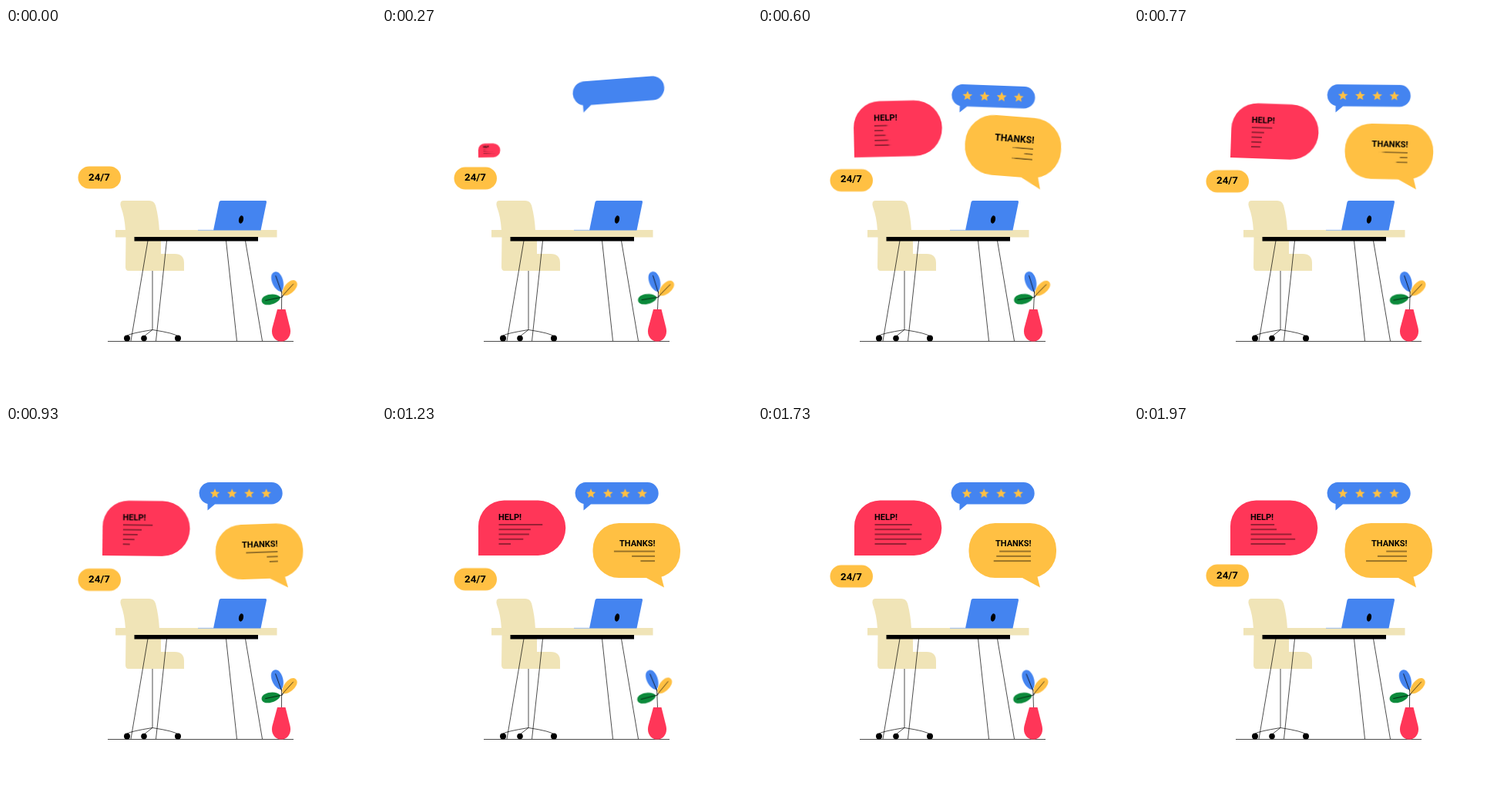
An HTML page without scripts that plays this animation: 480x480 px, repeating every 2 s.

```html
<!DOCTYPE html>
<html lang="en">
<head>
<meta charset="utf-8">
<title>Support desk</title>
<style>
  html, body { margin: 0; width: 100%; height: 100%; overflow: hidden; background: #fff; }
  svg { display: block; width: 100vw; height: 100vh; }
  text { font: 700 11px Roboto, Arial, sans-serif; }
  .blue { fill: #4484f0; }
  .red { fill: #ff3658; }
  .gold { fill: #ffc043; }
  .green { fill: #0c8a3b; }
  .sand { fill: #f0e4b7; }
  .thin { fill: none; stroke: #000; stroke-width: .7; }

  /* gentle two-second swings */
  .bob, .sway, .line { animation: bob 1s cubic-bezier(.37, 0, .63, 1) infinite alternate; }
  .late { animation-delay: -1.83s; }
  .sway { animation-name: sway; animation-delay: -1.55s; transform-origin: 357px 365px; }
  .line { animation-name: grow; animation-delay: calc(var(--t) * 1s - 2s); }
  @keyframes bob { to { transform: translateY(5.5px); } }
  @keyframes sway { from { transform: rotate(3deg); } to { transform: rotate(-3deg); } }
  @keyframes grow { from { transform: scaleX(var(--a)); } to { transform: scaleX(var(--b)); } }

  /* bubbles spring out of their tails */
  .pop { animation: 2s linear infinite; }
  .rate { animation-name: rate; transform-origin: 262px 109px; }
  .help { animation-name: help; transform-origin: 125px 168px; }
  .thanks { animation-name: thanks; transform-origin: 366px 209px; }
  @keyframes rate {
    0%, 3.33% { transform: rotate(0deg) scale(0); animation-timing-function: cubic-bezier(.3, .3, .6, 1); }
    13.3% { transform: rotate(-4.5deg) scale(1.1); animation-timing-function: cubic-bezier(.4, 0, .7, .6); }
    21.8% { transform: rotate(-1.2deg) scale(1.01); animation-timing-function: cubic-bezier(.3, .4, .6, 1); }
    29.8% { transform: rotate(2deg) scale(1); animation-timing-function: ease-in-out; }
    43.3%, to { transform: rotate(0deg) scale(1); }
  }
  @keyframes help {
    0%, 11.67% { transform: rotate(0deg) scale(0); animation-timing-function: cubic-bezier(.3, .3, .6, 1); }
    21.67% { transform: rotate(-4.5deg) scale(1.1); animation-timing-function: cubic-bezier(.4, 0, .7, .6); }
    30.2% { transform: rotate(-1.2deg) scale(1.01); animation-timing-function: cubic-bezier(.3, .4, .6, 1); }
    38.2% { transform: rotate(2deg) scale(1); animation-timing-function: ease-in-out; }
    51.7%, to { transform: rotate(0deg) scale(1); }
  }
  @keyframes thanks {
    0%, 20% { transform: rotate(0deg) scale(0); animation-timing-function: cubic-bezier(.3, .3, .6, 1); }
    30% { transform: rotate(4.5deg) scale(1.1); animation-timing-function: cubic-bezier(.4, 0, .7, .6); }
    38.5% { transform: rotate(1.2deg) scale(1.01); animation-timing-function: cubic-bezier(.3, .4, .6, 1); }
    46.5% { transform: rotate(-2deg) scale(1); animation-timing-function: ease-in-out; }
    60%, to { transform: rotate(0deg) scale(1); }
  }

  /* stars follow one another */
  .s1 { animation-name: s1; }
  .s2 { animation-name: s2; }
  .s3 { animation-name: s3; }
  .s4 { animation-name: s4; }
  @keyframes s1 { 0%, 14.7% { transform: scale(0); } 21.7% { transform: scale(1.05); } 29%, to { transform: scale(1); } }
  @keyframes s2 { 0%, 17.8% { transform: scale(0); } 24.8% { transform: scale(1.05); } 32%, to { transform: scale(1); } }
  @keyframes s3 { 0%, 20.8% { transform: scale(0); } 27.8% { transform: scale(1.05); } 35%, to { transform: scale(1); } }
  @keyframes s4 { 0%, 23.4% { transform: scale(0); } 30.4% { transform: scale(1.05); } 38%, to { transform: scale(1); } }
</style>
</head>
<body>
<svg viewBox="0 0 480 480">
  <defs>
    <path id="star" d="M0-6.5 1.8-2.3 6.2-2 2.9 1 3.8 5.3 0 3-3.8 5.3-2.9 1-6.2-2-1.8-2.3Z"/>
    <path id="leaf" d="M0 0C-9-4-10-27 0-27S9-4 0 0Z"/>
    <path id="vein" class="thin" d="M0 2V-22"/>
    <rect id="bar" y="-.4" width="1" height=".8"/>
  </defs>

  <!-- chair -->
  <path class="sand" d="M152 224H186Q192 224 194 230 198 245 199 263H155Q154 245 149 232 147 224 152 224Z"/>
  <path class="sand" d="M155.5 270H201V293H219Q231 293 231 305V315H159Q155 315 155 310Z"/>
  <path class="thin" d="M190 315V391M157 399Q162 396 190 391.5Q219 396 223 400M190 391.5 179 400"/>
  <circle cx="157" cy="402.6" r="4"/>
  <circle cx="179" cy="402.6" r="3.8"/>
  <circle cx="223" cy="402.6" r="4"/>

  <!-- desk and laptop -->
  <path class="thin" d="M184 276 162 406M208.500 276 194.500 406M285.500 276 299.500 406M310.500 276 332.500 406"/>
  <rect class="sand" x="142" y="262" width="209.500" height="9.500"/>
  <rect x="166.500" y="271" width="160.500" height="5.500"/>
  <path class="blue" d="M279 224H336.500Q338.500 224 338 226L330.500 262.500H269L276.500 226Q277 224 279 224Z"/>
  <rect x="249" y="261.800" width="21" height=".9" fill="#8fb6f2"/>
  <ellipse cx="305" cy="248.500" rx="3" ry="5.200" transform="rotate(12 305 248.500)"/>
  <path class="thin" d="M132 406.500H373"/>

  <!-- plant -->
  <g class="sway">
    <path class="thin" d="M357.500 366V340M357.500 350 361 345"/>
    <g transform="translate(357 342) rotate(-20)"><use href="#leaf" class="blue"/><use href="#vein"/></g>
    <g transform="translate(359 347) rotate(42) scale(.93)"><use href="#leaf" class="gold"/><use href="#vein"/></g>
    <g transform="translate(356 349.500) rotate(-102) scale(.92)"><use href="#leaf" class="green"/><use href="#vein"/></g>
  </g>
  <path class="red" d="M352 365H362.500L368.500 389C371 400 364 406.500 357 406.500S343 400 345.500 389Z"/>

  <!-- badge -->
  <rect class="gold bob" x="93.500" y="179.500" width="55.500" height="29" rx="14.500"/>
  <text class="bob late" x="121" y="197.900" text-anchor="middle" style="font-size:13.300px">24/7</text>

  <!-- rating -->
  <g class="pop rate">
    <path class="blue" d="M264 73H344.500A14.200 14.200 0 0 1 344.500 101.400H271L261.500 109.500V101A14.200 14.200 0 0 1 264 73Z"/>
    <g class="gold">
      <g transform="translate(271 87.700)"><use href="#star" class="pop s1"/></g>
      <g transform="translate(293.200 87.700)"><use href="#star" class="pop s2"/></g>
      <g transform="translate(315.400 87.700)"><use href="#star" class="pop s3"/></g>
      <g transform="translate(337.600 87.700)"><use href="#star" class="pop s4"/></g>
    </g>
  </g>

  <!-- question -->
  <g class="pop help">
    <path class="red" d="M125 168V130A33.500 33.500 0 0 1 158.500 96.500H202.500A35.700 35.700 0 0 1 202.500 168Z"/>
    <text x="151" y="121.500">HELP!</text>
    <g transform="translate(151.500 128)"><use href="#bar" class="line" style="--a:12;--b:60;--t:.4"/></g>
    <g transform="translate(151.500 134.200)"><use href="#bar" class="line" style="--a:11;--b:49;--t:.53"/></g>
    <g transform="translate(151.500 140.500)"><use href="#bar" class="line" style="--a:13;--b:61;--t:.7"/></g>
    <g transform="translate(151.500 146.800)"><use href="#bar" class="line" style="--a:13;--b:61;--t:.8"/></g>
    <g transform="translate(151.500 153)"><use href="#bar" class="line" style="--a:9;--b:45;--t:.95"/></g>
  </g>

  <!-- reply -->
  <g class="pop thanks">
    <rect class="gold" x="273.500" y="126" width="113.500" height="71" rx="34"/>
    <path class="gold" d="M341 196 366 209.500 361 190Z"/>
    <text x="308" y="156">THANKS!</text>
    <g transform="translate(354 162.600) scale(-1 1)"><use href="#bar" class="line" style="--a:16;--b:54;--t:.33"/></g>
    <g transform="translate(354 168.900) scale(-1 1)"><use href="#bar" class="line" style="--a:9;--b:45;--t:.68"/></g>
    <g transform="translate(354 175.100) scale(-1 1)"><use href="#bar" class="line" style="--a:11;--b:53;--t:.95"/></g>
  </g>
</svg>
</body>
</html>
```
